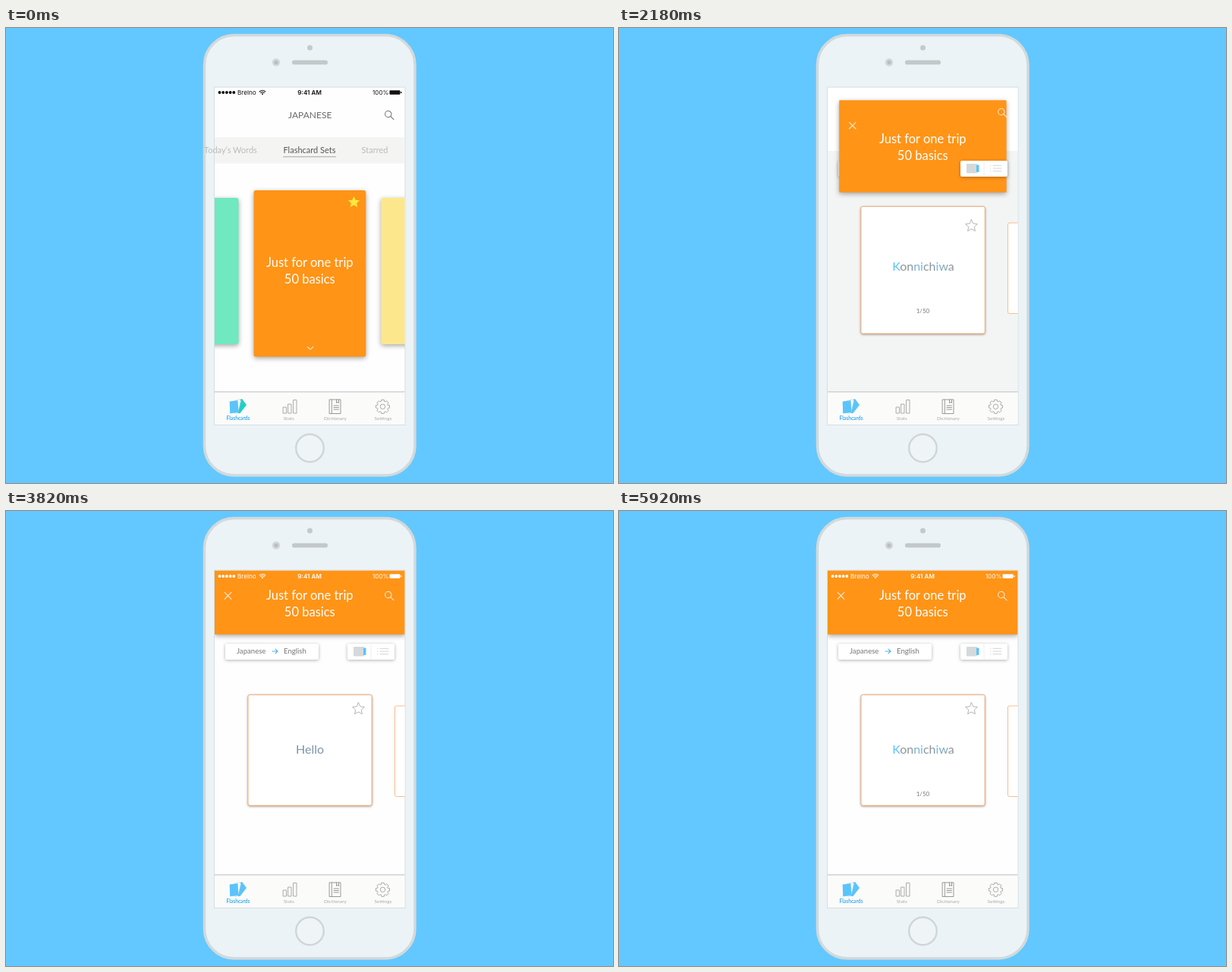
An HTML page that plays this animation: 800 px wide and 600 px high, repeating every 5.94 s.

```html
<!DOCTYPE html>
<html lang="en">
<head>
<meta charset="utf-8">
<title>Flashcards</title>
<style>
html, body { margin: 0; width: 100%; height: 100%; overflow: hidden; background: #63c8ff; }
svg { display: block; width: 800px; height: 600px; }
text { font-family: Lato, "Open Sans", sans-serif; }
.status text { font-family: Inter, Roboto, sans-serif; font-size: 8.1px; }
.mid { text-anchor: middle; }
.line { fill: none; stroke-linecap: round; stroke-linejoin: round; }
.soft { filter: drop-shadow(0 1px 2px rgba(0,0,0,.3)); }
.deep { filter: drop-shadow(0 2px 3px rgba(0,0,0,.35)); }
</style>
</head>
<body>
<svg id="stage" viewBox="0 0 800 600" xmlns="http://www.w3.org/2000/svg"></svg>
<script>
const LOOP = 5940;
const ORANGE = '#ff9417', BLUE = '#5bc4fb';

const clamp = v => Math.max(0, Math.min(1, v));
const mix = (a, b, p) => a + (b - a) * p;
const smooth = p => p * p * (3 - 2 * p);
const span = (t, start, length) => smooth(clamp((t - start) / length));

const polar = (cx, cy, r, a) => (cx + r * Math.cos(a)).toFixed(2) + ' ' + (cy + r * Math.sin(a)).toFixed(2);

function star(cx, cy, r) {
  const points = Array.from({ length: 10 }, (_, i) =>
    polar(cx, cy, i % 2 ? r * 0.48 : r, (i * 36 - 90) * Math.PI / 180));
  return 'M' + points.join('L') + 'Z';
}

function gear(cx, cy) {
  const points = [];
  for (let i = 0; i < 8; i++) {
    [[-0.3, 7.2], [-0.19, 9.2], [0.19, 9.2], [0.3, 7.2]].forEach(([a, r]) =>
      points.push(polar(cx, cy, r, i * Math.PI / 4 + a)));
  }
  return 'M' + points.join('L') + 'Z';
}

const rect = (x, y, w, h, attrs) => `<rect x="${x}" y="${y}" width="${w}" height="${h}" ${attrs}/>`;
const text = (x, y, size, fill, label, attrs = '') =>
  `<text x="${x}" y="${y}" font-size="${size}" fill="${fill}" ${attrs}>${label}</text>`;
const path = (d, stroke, width = 1, attrs = '') =>
  `<path class="line" d="${d}" stroke="${stroke}" stroke-width="${width}" ${attrs}/>`;

function statusBar(id, color, y) {
  const dots = [0, 1, 2, 3, 4].map(i => `<circle cx="${281.5 + i * 4.7}" cy="${y}" r="1.95"/>`).join('');
  return `<g id="${id}" class="status" fill="${color}">${dots}
    ${text(305, y + 3, 8.1, color, 'Brelno')}
    ${path(`M334.3 ${y - 1.2}Q338 ${y - 4.3} 341.7 ${y - 1.2}M335.8 ${y + .4}Q338 ${y - 1.4} 340.2 ${y + .4}`, color, 1.2)}
    <circle cx="338" cy="${y + 1.9}" r="1"/>
    ${text(400, y + 3, 8.1, color, '9:41 AM', 'class="mid" font-weight="600"')}
    ${text(483, y + 3, 8.1, color, '100%')}
    ${rect(505.5, y - 2.7, 14, 5.4, 'rx="1"')}${rect(520.2, y - 1, 1.3, 2, '')}
  </g>`;
}

const magnifier = (id, y, color) =>
  `<g id="${id}">${path(`M499.6 ${y - 1.5}a4.2 4.2 0 1 0 8.4 0a4.2 4.2 0 1 0 -8.4 0M507 ${y + 1.7}L511 ${y + 5.6}`, color, 1.1)}</g>`;

const phone = `
  ${rect(0, 0, 800, 600, 'fill="#63c8ff"')}
  ${rect(261.5, 9.5, 277.5, 580.5, 'rx="39" fill="#ecf3f6" stroke="#d2d9db" stroke-width="3.5"')}
  <circle cx="400.5" cy="26" r="3.5" fill="#c5c9cb"/>
  <circle cx="356" cy="45.3" r="5.2" fill="#d3d7d9"/><circle cx="356" cy="45.3" r="2.6" fill="#b9bec0"/>
  ${rect(377, 42.6, 47, 5.6, 'rx="2.8" fill="#c3c8ca"')}
  <circle cx="400.5" cy="554" r="18.3" fill="#eff5f7" stroke="#d0d6d8" stroke-width="2.4"/>
  ${rect(274.5, 78, 251.5, 445.5, 'fill="#fefefe" stroke="#d4dfe1"')}`;

const home = `
  <g id="home">
    ${text(400.7, 119, 12, '#6a6a6a', 'JAPANESE', 'class="mid"')}
    ${magnifier('searchDark', 115, '#777')}
  </g>
  <g id="tabs">
    ${rect(275, 144, 250.5, 34.5, 'fill="#f4f4f3"')}
    ${text(400, 164.7, 11, '#555', 'Flashcard Sets', 'class="mid"')}
    ${path('M365.5 169.8H434.5', '#a5a5a5', 1)}
    ${text(486, 164.7, 11, '#bbb', 'Starred', 'class="mid"')}
  </g>
  <g id="sides">
    ${rect(160, 224, 146.5, 193, 'id="leftSide" class="deep" rx="3" fill="#70e8c0"')}
    ${rect(494.3, 224, 147, 193, 'id="rightSide" class="deep" rx="3" fill="#fde78d"')}
  </g>`;

const study = `
  ${rect(275, 79, 250.5, 444, 'id="veil" fill="#f3f5f5"')}
  ${rect(275, 79, 250.5, 83, 'id="band" fill="#fff"')}
  ${rect(512.5, 257, 130, 119.5, 'id="nextCard" rx="2" fill="#fff" stroke="#f8bd8c"')}
  <g id="panel">
    ${rect(319, 214, 164, 235, 'id="panelShape" rx="3" fill="#fff"')}
    <g id="startButton">
      ${rect(343.3, 414.2, 115.8, 18.8, 'rx="9.4" fill="#fff" stroke="#62bfe9"')}
      ${text(400.5, 426.4, 8, '#4fb4e8', 'Start', 'class="mid"')}
    </g>
    <g id="face">
      ${path(star(464.5, 261, 8.3), '#b4b4b4')}
      <g id="front">
        ${text(401, 320, 16, '#8f9498', `<tspan fill="${BLUE}">K</tspan>on<tspan fill="#79b4d4">n</tspan><tspan fill="${BLUE}">i</tspan>ch<tspan fill="${BLUE}">i</tspan><tspan fill="#83a9bd">w</tspan>a`, 'class="mid"')}
        ${text(400.5, 376.3, 8, '#777', '1/50', 'class="mid"')}
      </g>
      <g id="back">${text(400.5, 320, 16, '#7896aa', 'Hello', 'class="mid"')}</g>
    </g>
  </g>
  <g id="language">
    ${rect(289, 175, 123, 21, 'class="soft" rx="2" fill="#fff"')}
    ${text(304, 188.2, 9.6, '#777', 'Japanese')}
    ${path('M351 185H357.8M355 182.2L358 185L355 187.8', '#4fb3e0', 1.1)}
    ${text(366, 188.2, 9.6, '#777', 'English')}
  </g>
  <g id="cover">
    ${rect(326.5, 214, 148, 219.5, `id="coverShape" class="deep" fill="${ORANGE}"`)}
    <g id="coverMarks">
      <path id="coverStar" d="${star(458.5, 15.8, 8)}" fill="#ffe83d"/>
      <g id="chevron">${path('M397.3 -13L401 -9.5L404.7 -13', '#ffdcae', 1.2)}</g>
    </g>
    <g id="title">
      ${text(400.3, 0, 16.5, '#fff', 'Just for one trip', 'class="mid"')}
      ${text(400.3, 22, 16.5, '#fff', '50 basics', 'class="mid"')}
    </g>
    <g id="close">${path('M-4.3 -4.3L4.3 4.3M4.3 -4.3L-4.3 4.3', '#ffeeda', 1.1)}</g>
  </g>
  ${magnifier('searchLight', 112, '#ffe9d0')}
  <g id="toggle">
    ${rect(450, 175, 62, 21, 'class="soft" rx="2" fill="#fff"')}
    ${path('M481 176V195', '#eee')}
    ${rect(458, 179, 14, 12.5, 'rx="1" fill="#d6d9da"')}
    ${rect(471, 180.5, 3.5, 9.5, `rx=".7" fill="${BLUE}"`)}
    ${path('M489.5 181.3H490M489.5 185H490M489.5 188.7H490M493 181.3H504M493 185H504M493 188.7H504', '#d4d4d4')}
  </g>`;

const tabBar = `
  ${rect(275, 480, 250.5, 43, 'fill="#fbfbfa"')}
  ${path('M275 479.7H525.5', '#cfd2d3', 1.4)}
  <path d="M306.5 491L311 489L317 497L308.5 508H304Z" id="cardIcon"/>
  <path d="M300 492L307 489.5L309.5 491.5L305.5 508H301Z" fill="#fff" stroke="#bfd3dc" stroke-width=".6"/>
  <path d="M294.7 492.5L305.5 491L306.5 507L295.2 508.3Z" fill="${BLUE}"/>
  ${text(306, 517, 6.7, '#25a5ee', 'Flashcards', 'class="mid" font-weight="600"')}
  ${path('M365.5 500h4v8h-4zM372 496h4v12h-4zM379 490.5h4v17.5h-4z', '#aaa')}
  ${text(372.7, 517, 6.5, '#aaa', 'Stats', 'class="mid"')}
  ${path('M426.5 490h14.5v18.5h-14.5zM429.3 490v18.5M432 498h6.5M432 500.5h6.5M432 503h6.5M435.5 490v4.5l1.5 -1.2l1.5 1.2v-4.5', '#999')}
  ${text(434, 517, 6.5, '#aaa', 'Dictionary', 'class="mid"')}
  ${path(gear(496.5, 499.3), '#aaa')}
  <circle cx="496.5" cy="499.3" r="3.2" fill="none" stroke="#aaa"/>
  ${text(497, 516.5, 6.5, '#aaa', 'Settings', 'class="mid"')}`;

const stage = document.getElementById('stage');
stage.innerHTML = `
  <defs><clipPath id="screen">${rect(275, 78.5, 250.5, 444.5, '')}</clipPath></defs>
  ${phone}
  <g clip-path="url(#screen)">${home}${study}
    ${statusBar('statusDark', '#111', 85)}${statusBar('statusLight', '#fff', 86)}${tabBar}
  </g>
  ${text(261, 164.7, 11, '#bbb', 'Today’s Words', 'id="firstTab"')}`;

const el = {};
stage.querySelectorAll('[id]').forEach(node => { el[node.id] = node; });

function set(id, attrs) {
  for (const name in attrs) el[id].setAttribute(name, attrs[name]);
}
function fade(id, opacity) {
  const value = clamp(opacity);
  set(id, { opacity: value, visibility: value > 0 ? 'visible' : 'hidden' });
}
const move = (id, x, y) => set(id, { transform: `translate(${x} ${y})` });

function drawHome(lift, open) {
  fade('home', 1 - open * 4);
  fade('statusDark', 1 - open * 4);
  fade('tabs', 1 - lift * 1.4);
  fade('firstTab', 1 - lift * 1.4);
  fade('sides', 1 - open * 2);
  move('leftSide', -1.7 * lift - 45 * open, 0);
  move('rightSide', 3.5 * lift + 45 * open, 0);
}

function drawCover(lift, open) {
  const x = mix(326.5, 275, open ** 1.24);
  const height = mix(219.5, 84.5, open ** 1.14);
  const middle = mix(mix(323.7, 296.3, lift), 120.5, open ** 0.8);
  const top = middle - height / 2;
  set('coverShape', { x, y: top, width: 2 * (400.4 - x), height, rx: 3 * (1 - open) });
  move('coverStar', 0, top);
  move('chevron', 0, top + height);
  fade('coverMarks', 1 - open * 3);
  move('title', 0, mix(mix(315.3, 240, lift), 117, open ** 1.19));
  move('close', x + 17.5, top + 33.5);
  fade('close', open * 2 - 0.6);
}

function drawStudy(open) {
  const late = open * 4 - 1.4;
  fade('veil', Math.min(open * 4, (1 - open) * 5));
  fade('band', open * 4);
  fade('nextCard', late);
  fade('language', late);
  fade('toggle', late);
  fade('searchLight', late);
  fade('statusLight', open * 6 - 5);
  set('cardIcon', { fill: open > 0.4 ? BLUE : '#22cfc5' });
}

function drawPanel(lift, open, t) {
  const first = span(t, 3005, 600), second = span(t, 4283, 600);
  const turn = Math.cos((first + second) * Math.PI);
  const facing = Math.abs(turn);
  const turning = facing < 0.999;
  const half = mix(mix(74, 82, lift), 81.6, open) * facing;
  const grow = 2 * Math.sqrt(1 - facing * facing);
  const top = mix(214, 242.3, open) - grow;
  const bottom = mix(mix(433, 448, lift), 388.3, open) + grow;
  const shade = clamp(facing * 3 - 2);
  const tint = turning && first < 1 ? '#a9785f' : '#f1ac74';
  set('panelShape', {
    x: 400.6 - half, y: top, width: 2 * half, height: bottom - top,
    rx: 2.5 * shade, stroke: tint, 'stroke-opacity': clamp(open * 2 - 0.4)
  });
  el.panelShape.style.filter = shade ? `drop-shadow(0 1.5px 1.5px rgba(70,45,30,${0.45 * shade}))` : 'none';
  fade('panel', lift * 8);
  fade('startButton', 1 - open * 5);
  fade('face', Math.min(shade, open * 4 - 1.6));
  set('face', { transform: `translate(400.6 0) scale(${Math.max(facing, 0.001)} 1) translate(-400.6 0)` });
  fade('front', turn >= 0 ? 1 : 0);
  fade('back', turn < 0 ? 1 : 0);
}

function draw(t) {
  const lift = span(t, 300, 650);
  const open = span(t, 1300, 1300);
  drawHome(lift, open);
  drawStudy(open);
  drawPanel(lift, open, t);
  drawCover(lift, open);
}

let start;
function tick(now) {
  start ??= now;
  draw((now - start) % LOOP);
  requestAnimationFrame(tick);
}
draw(0);
requestAnimationFrame(tick);
</script>
</body>
</html>
```
